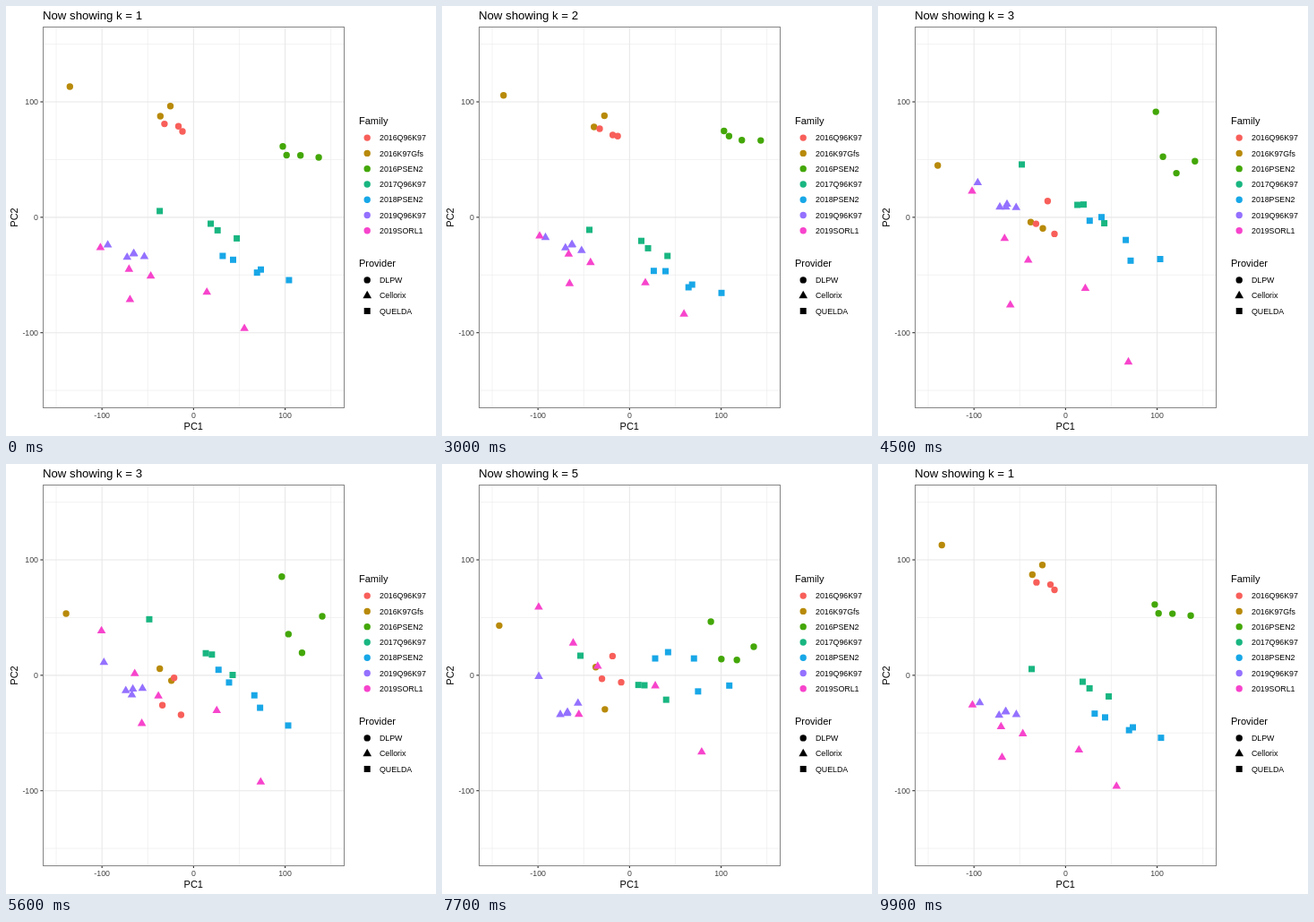
Animation of 480 by 480 pixels, one loop 10000 ms. Source, as an HTML page:

```html
<!DOCTYPE html>
<html lang="en">
<head>
<meta charset="utf-8">
<title>PCA by k</title>
<style>
  html, body { margin: 0; width: 100%; height: 100%; overflow: hidden; background: #fff; }
  svg { display: block; width: 100vw; height: 100vh; }
  text { font-family: "Liberation Sans", Arial, sans-serif; font-size: 11px; fill: #000; }
  text.small { font-size: 8.8px; }
  text.axis { fill: #3e3e3e; }
</style>
</head>
<body>
<svg id="stage" viewBox="0 0 480 480"></svg>
<script>
const stage = document.getElementById('stage');

function add(tag, attrs, content = '') {
  const node = document.createElementNS('http://www.w3.org/2000/svg', tag);
  for (const key in attrs) node.setAttribute(key, attrs[key]);
  node.textContent = content;
  return stage.appendChild(node);
}

const label = (x, y, content, attrs = {}) => add('text', { x, y, ...attrs }, content);
const line = (x1, y1, x2, y2, stroke, width) =>
  add('line', { x1, y1, x2, y2, stroke, 'stroke-width': width });

const SHAPES = {
  circle: 'M-3.7 0a3.7 3.7 0 1 0 7.4 0a3.7 3.7 0 1 0 -7.4 0Z',
  triangle: 'M0 -4.15L4.8 4.15H-4.8Z',
  square: 'M-3.5 -3.5H3.5V3.5H-3.5Z'
};

function mark(shape, fill, x = 0, y = 0) {
  return add('path', { d: SHAPES[shape], fill, transform: `translate(${x} ${y})` });
}

// Plot panel
const LEFT = 41.5, RIGHT = 377.5, TOP = 23.5, BOTTOM = 448.5;
const xAt = v => 209.35 + v * 1.022;
const yAt = v => 235.85 - v * 1.2885;

function grid(values, color, width) {
  for (const v of values) {
    line(LEFT, yAt(v), RIGHT, yAt(v), color, width);
    line(xAt(v), TOP, xAt(v), BOTTOM, color, width);
  }
}
grid([-150, -50, 50, 150], '#e8e8e8', 0.55);
grid([-100, 0, 100], '#e8e8e8', 1.07);

for (const v of [-100, 0, 100]) {
  line(38.4, yAt(v), 41, yAt(v), '#272727', 1.07);
  line(xAt(v), 448.5, xAt(v), 451.1, '#272727', 1.07);
  label(36, yAt(v) + 3.1, v, { class: 'small axis', 'text-anchor': 'end' });
  label(xAt(v), 460, v, { class: 'small axis', 'text-anchor': 'middle' });
}
label(209.3, 473, 'PC1', { 'text-anchor': 'middle' });
label(0, 0, 'PC2', { 'text-anchor': 'middle', transform: 'translate(13 236) rotate(-90)' });
const title = label(41, 15, '', { style: 'font-size:13.2px' });

// Each point lists its x, y for k = 1 to 5
const points = [];
function series(shape, color, paths) {
  for (const path of paths) points.push({ node: mark(shape, color), path });
}

const RED = '#f85f5a', OLIVE = '#b88a0a', GREEN = '#43a708', TEAL = '#19b681',
      BLUE = '#18a7e7', VIOLET = '#9471ff', PINK = '#f744cc';

series('circle', OLIVE, [
  [71.3, 90, 68.7, 99.7, 66.7, 178, 67.3, 161, 63.3, 183.7],
  [172.3, 123, 169.7, 135, 170.5, 241.2, 172.3, 221.6, 171.5, 227.7],
  [183.5, 111.8, 181.3, 122.5, 184, 248.2, 185, 238.4, 181.3, 280]
]);
series('circle', RED, [
  [176.9, 131.6, 176, 137, 176.4, 243.1, 173.6, 283.5, 179.4, 232.2],
  [192.5, 134.2, 190.6, 144, 189.4, 217.7, 186.7, 250.2, 191, 208.2],
  [197, 140, 196.1, 145.3, 197, 254.4, 194.5, 293.9, 201, 234.9]
]);
series('circle', GREEN, [
  [309, 156.7, 314.8, 139.5, 310.2, 118.1, 306.6, 130, 299, 184],
  [313.2, 166.5, 320.4, 145.3, 318.1, 168.3, 313.8, 201.6, 311.5, 220.5],
  [328.7, 166.8, 334.7, 149.8, 333.1, 186.6, 329, 223.8, 329.2, 217.8],
  [349.1, 169, 355.8, 150.1, 353.8, 173.3, 352.6, 168.3, 347.2, 210.2]
]);
series('square', TEAL, [
  [171.6, 228.9, 164.5, 249.9, 160.5, 176.9, 159.6, 171.4, 153.6, 221.4],
  [228.5, 243, 222.5, 262.2, 222.6, 222, 223.3, 205.4, 218.5, 253.8],
  [236.2, 250.4, 230, 270.4, 229.5, 221.6, 230, 207.9, 225.3, 253.8],
  [257.6, 259.4, 251.7, 279, 252.6, 242.5, 253.2, 231.7, 249.7, 268.6]
]);
series('square', BLUE, [
  [241.9, 279, 236.4, 295.7, 236.3, 239.7, 237.7, 224.3, 238, 215.8],
  [253.5, 283.3, 249.5, 296, 249.5, 235.7, 248.7, 248.3, 253, 203.4],
  [280.2, 297.6, 275.2, 314, 276.6, 261.2, 277.6, 256.6, 281.9, 210.2],
  [284.5, 294.2, 279.2, 311, 282, 284.3, 284.5, 265.5, 286.1, 251.8],
  [315.9, 306, 312, 320.3, 315, 282.5, 315, 297, 321.7, 238.7]
]);
series('triangle', VIOLET, [
  [113.6, 265.3, 115.5, 257, 111.3, 195.8, 108.2, 233.3, 108, 236.2],
  [135.2, 279.2, 137.8, 268.7, 136, 223, 132.5, 267, 132, 280.2],
  [142.7, 274.8, 145.2, 264.9, 144, 219.8, 140.3, 266, 140, 277.2],
  [142.4, 275.4, 144.8, 265.4, 142.8, 223, 139.3, 274.5, 139.7, 277.6],
  [154.4, 278.3, 155.8, 271.6, 154.2, 223.6, 151.3, 262.9, 151.9, 266.1]
]);
series('triangle', PINK, [
  [105.4, 268.3, 109, 255.4, 105, 205.4, 107.4, 173.7, 108, 155.7],
  [137.3, 292.5, 141.4, 275.6, 141.3, 258.1, 145, 218.7, 146.7, 195],
  [161.6, 300.2, 165.8, 285, 167.7, 282.3, 171.4, 244.4, 174.2, 221],
  [138.4, 326.3, 142.4, 308.5, 147.7, 332.3, 153.7, 264.4, 152.6, 280.5],
  [224.2, 318.2, 227, 307.7, 231.4, 313.8, 237.3, 252.2, 238.2, 245.2],
  [266.1, 358.6, 270.1, 342.5, 279.5, 396, 286.9, 330.8, 290.4, 318.3]
]);

add('rect', {
  x: LEFT, y: TOP, width: RIGHT - LEFT, height: BOTTOM - TOP,
  fill: 'none', stroke: '#858585'
});

// Legends
function legend(name, titleY, firstY, entries) {
  label(394, titleY, name);
  entries.forEach(([content, color, shape], i) => {
    const y = firstY + i * 17.28;
    mark(shape, color, 403.2, shape === 'triangle' ? y - 1.2 : y);
    label(417, y + 3.2, content, { class: 'small' });
  });
}
legend('Family', 132, 147.1, [
  ['2016Q96K97', RED, 'circle'],
  ['2016K97Gfs', OLIVE, 'circle'],
  ['2016PSEN2', GREEN, 'circle'],
  ['2017Q96K97', TEAL, 'circle'],
  ['2018PSEN2', BLUE, 'circle'],
  ['2019Q96K97', VIOLET, 'circle'],
  ['2019SORL1', PINK, 'circle']
]);
legend('Provider', 291, 305.9, [
  ['DLPW', '#000', 'circle'],
  ['Cellorix', '#000', 'triangle'],
  ['QUELDA', '#000', 'square']
]);

// Motion: ten ticks per second, twenty ticks per state, the last nine easing onward
const TICK = 100, STATES = 5, TICKS_PER_STATE = 20, HOLD = 11, MOVE = 9;
const cubicInOut = p => p < 0.5 ? 4 * p ** 3 : 1 - 4 * (1 - p) ** 3;

function render(ms) {
  const tick = Math.floor(ms / TICK) % (STATES * TICKS_PER_STATE);
  const from = Math.floor(tick / TICKS_PER_STATE);
  const to = (from + 1) % STATES;
  const step = Math.max(0, tick % TICKS_PER_STATE - HOLD);
  const eased = cubicInOut(step / MOVE);
  const mix = (path, axis) => {
    const a = path[from * 2 + axis], b = path[to * 2 + axis];
    return (a + (b - a) * eased).toFixed(2);
  };
  for (const { node, path } of points) {
    node.setAttribute('transform', `translate(${mix(path, 0)} ${mix(path, 1)})`);
  }
  title.textContent = `Now showing k = ${(step > 5 ? to : from) + 1}`;
}

const start = performance.now();
function loop() {
  render(performance.now() - start);
  requestAnimationFrame(loop);
}
loop();
</script>
</body>
</html>
```
